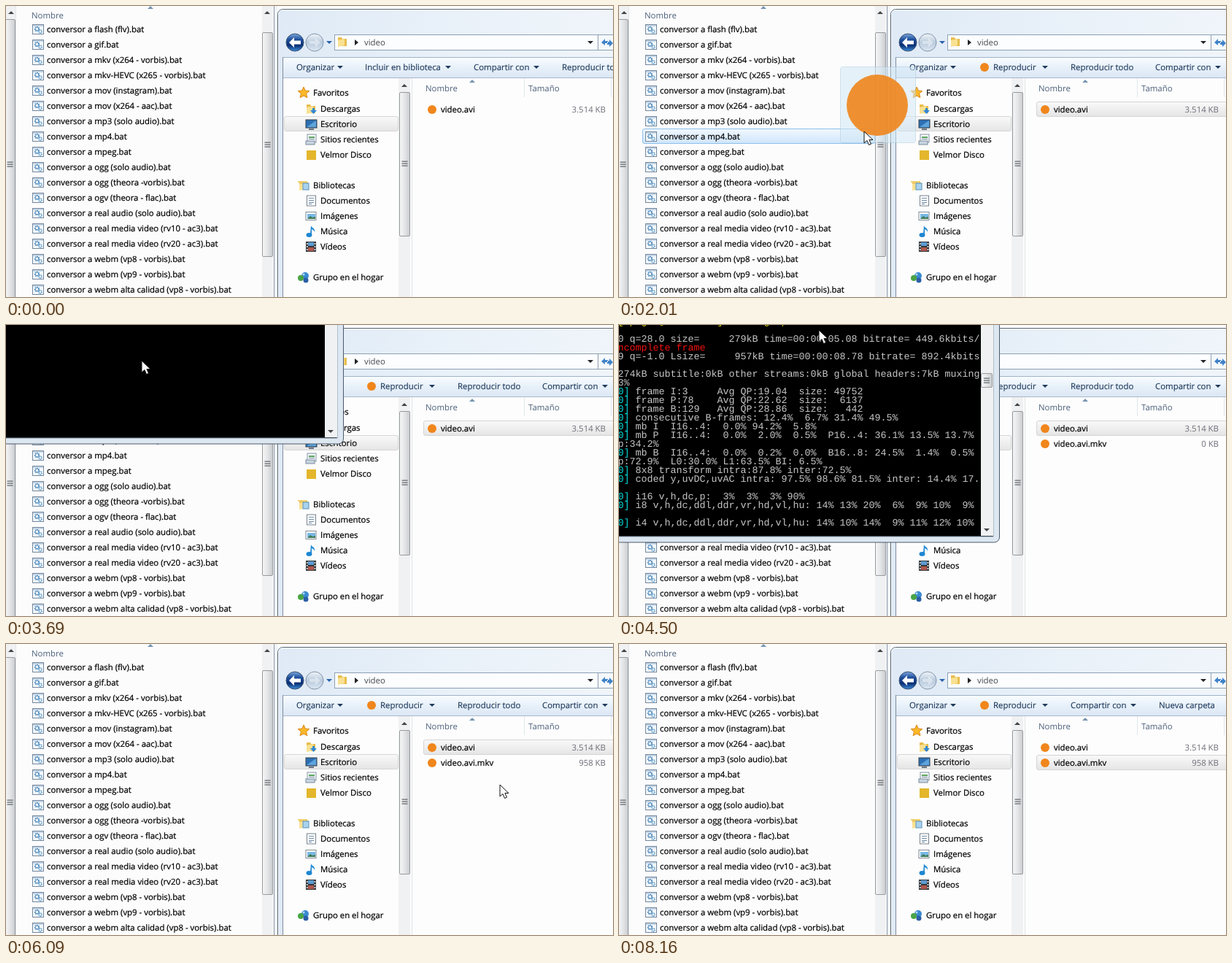
An HTML page that plays this animation: 832 by 399 pixels, repeating every 8250 ms.

```html
<!DOCTYPE html>
<html lang="es">
<head>
<meta charset="utf-8">
<title>Convertir vídeo arrastrando</title>
<style>
  html, body { margin: 0; width: 100%; height: 100%; overflow: hidden; background: #fff; }
  svg { display: block; width: 832px; height: 399px; }
  text { font: 11.4px "Open Sans", "Noto Sans", sans-serif; fill: #000; white-space: pre; text-rendering: geometricPrecision; }
  text[class=""] { stroke: #000; stroke-width: .22px; }
  .head { fill: #4c607a; }
  .bar { fill: #1e395b; stroke: #1e395b; stroke-width: .15px; }
  .size { fill: #6d6d78; text-anchor: end; }
  .address { fill: #45484d; }
  .tip { fill: #1c3fae; stroke: #1c3fae; stroke-width: .15px; }
  .tip tspan { fill: #00005c; stroke: #00005c; }
  .log { font: 13.33px "Liberation Mono", monospace; fill: #c6c6c6; }
  .log .tag { fill: #00e0e0; }
  .red { fill: #f01010; }
  .yellow { fill: #e8e800; }
</style>
</head>
<body>
<svg id="stage" viewBox="0 0 832 399"></svg>
<script>
const LOOP = 8250, STEP = 30, ROW = 21;

const names = ['flash (flv)', 'gif', 'mkv (x264 - vorbis)', 'mkv-HEVC (x265 - vorbis)',
  'mov (instagram)', 'mov (x264 - aac)', 'mp3 (solo audio)', 'mp4', 'mpeg', 'ogg (solo audio)',
  'ogg (theora -vorbis)', 'ogv (theora - flac)', 'real audio (solo audio)',
  'real media video (rv10 - ac3)', 'real media video (rv20 - ac3)', 'webm (vp8 - vorbis)',
  'webm (vp9 - vorbis)', 'webm alta calidad (vp8 - vorbis)'].map(n => `conversor a ${n}.bat`);

// Markup helpers; text is placed by its vertical centre.
const text = (x, y, s, cls = '', id = '') => `<text x="${x}" y="${y + 4}" class="${cls}" id="${id}">${s}</text>`;
const rect = (x, y, w, h, fill, extra = '') => `<rect x="${x}" y="${y}" width="${w}" height="${h}" fill="${fill}" ${extra}/>`;
const path = (d, fill, extra = '') => `<path d="${d}" fill="${fill}" ${extra}/>`;
const disc = (x, y, r, fill, extra = '') => `<circle cx="${x}" cy="${y}" r="${r}" fill="${fill}" ${extra}/>`;
const group = (id, body) => `<g id="${id}">${body}</g>`;
const at = (x, y, body) => `<g transform="translate(${x} ${y})">${body}</g>`;
const down = (x, y, fill = '#1e395b') => path(`M${x - 4} ${y - 2}h8l-4 4z`, fill);
const up = (x, y, fill = '#444') => path(`M${x - 4} ${y + 2}h8l-4-4z`, fill);
const gradient = (id, stops, horizontal) => `<linearGradient id="${id}" x2="${horizontal ? 1 : 0}" y2="${horizontal ? 0 : 1}">` +
  stops.map((c, i) => `<stop offset="${i / (stops.length - 1)}" stop-color="${c}"/>`).join('') + '</linearGradient>';
const media = (x, y) => disc(x, y, 6, '#f0861c');

const grip = (x, y) => [-3, 0, 3].map(d => rect(x - 4, y + d - .5, 8, 1.2, '#5f6469')).join('');
const thumb = (x, y, w, h, gripY) =>
  rect(x + .5, y + .5, w - 1, h - 1, 'url(#thumb)', 'stroke="#979a9e" rx="1.5"') + grip(x + w / 2, gripY);
const highlight = (id, x, y, w, fill, stroke) =>
  rect(x + .5, y + .5, w, 20, `url(#${fill})`, `stroke="${stroke}" rx="2.5" id="${id}"`);

const batIcon = rect(-7.5, -6.5, 15, 13, '#f3f8fc', 'stroke="#74879b"') + rect(-7, -6, 14, 2, '#c3d4e5') +
  disc(-1.5, -.5, 2.6, 'none', 'stroke="#3f7fb5" stroke-width="2" stroke-dasharray="1.5 .8"') +
  disc(3, 3, 2, 'none', 'stroke="#4f92c4" stroke-width="1.6" stroke-dasharray="1.2 .7"');
const folder = path('M-6-6h5l1 2h6v10h-12z', '#e9bd4e') + path('M-6-2l9-2v9l-9 2z', '#f9e193');

const icons = {
  star: path('M0-8l2.3 5 5.5.5-4.2 3.7 1.3 5.5L0 4l-4.9 2.7 1.3-5.5-4.2-3.7 5.5-.5z', '#fbb829', 'stroke="#d98516"'),
  download: folder + path('M2-1h3v3h3l-4.5 5-4.5-5h3z', '#2f87d6'),
  desktop: rect(-7, -6, 15, 11, '#2d6fb4', 'stroke="#39444f"') + path('M-6 4l13-9v9z', '#5da3dc') + rect(-3, 6, 7, 2, '#6a7581'),
  recent: rect(-5, -7, 12, 11, '#f4f7fa', 'stroke="#8695a5"') + rect(-3, -4, 8, 2, '#58a05b') + rect(-3, -1, 8, 1, '#7a8ca0') + rect(-7, 2, 12, 5, '#c8d5e1', 'stroke="#7c8c9c"'),
  cloud: rect(-6, -6, 13, 13, '#e3b62c'),
  library: folder + rect(-1, -3, 8, 9, '#a8d2ee', 'stroke="#5b93b8"') + path('M-8-6h13v2h-13z', '#f1d173'),
  document: rect(-5.5, -7, 12, 14, '#fff', 'stroke="#76818d"') + [-4, -1, 2].map(y => rect(-3, y, 7, 1, '#6e8ba8')).join('') + rect(-3, 4, 4, 1, '#6e8ba8'),
  image: rect(-7, -5.5, 14, 11, '#fff', 'stroke="#7d8995"') + rect(-5, -3, 11, 7, '#79b9e6') + path('M-5 4l4-4 3 2 4-1v3z', '#3f7b56'),
  music: path('M0-8c1 4 6 3 5 9c-1-3-2-3-4-4v7h-2z', '#1d86d2') + '<ellipse cx="-2.5" cy="5" rx="4" ry="3" fill="#1d86d2"/>',
  film: rect(-7, -7, 14, 14, '#33383d') + rect(-4, -6, 8, 5, '#5c9bd1') + rect(-4, 1, 8, 5, '#b0574c') +
    [-5, -1, 3].map(y => rect(-6, y, 1.5, 2, '#eee') + rect(4.7, y, 1.5, 2, '#eee')).join(''),
  home: disc(2, -2, 5, '#3b8ad0') + disc(-4, 1, 4, '#4aa546') + disc(3, 4, 3.5, '#2b5fa6') + disc(0, -4, 1.5, '#b4dcf5'),
};
const places = [['star', 0, 119, 'Favoritos'], ['download', 1, 141, 'Descargas'], ['desktop', 1, 162, 'Escritorio'],
  ['recent', 1, 183, 'Sitios recientes'], ['cloud', 1, 204, 'Velmor Disco'], ['library', 0, 246, 'Bibliotecas'],
  ['document', 1, 267, 'Documentos'], ['image', 1, 288, 'Imágenes'], ['music', 1, 309, 'Música'],
  ['film', 1, 330, 'Vídeos'], ['home', 0, 372, 'Grupo en el hogar']];

const defs = `<defs>
  ${gradient('thumb', ['#f7f7f8', '#e4e5e7', '#c9cccf'], true)}
  ${gradient('glass', ['#dfeaf6', '#e9f1f9', '#f0f5fa'], true)}
  ${gradient('tools', ['#fafdff', '#e8f1fa', '#dce7f5'])}
  ${gradient('blue', ['#f1f8fe', '#cfe5fb'])}
  ${gradient('hover', ['#fafcff', '#ebf4fd'])}
  ${gradient('grey', ['#f9f9f9', '#e5e5e5'])}
  ${gradient('back', ['#7fa9dc', '#1d4f9c', '#0b2f73', '#3f8fdc'])}
  ${gradient('next', ['#f0f4f9', '#b9cadd', '#dce7f2'])}
</defs>`;

const leftWindow = rect(0, 0, 368, 399, '#fcfcfd') +
  rect(0, 0, 13, 399, '#f0f1f2') + thumb(-2, 18, 15, 420, 217) + up(7, 9) + rect(13, 0, 1, 399, '#e2e5e9') +
  text(35, 13, 'Nombre', 'head') + up(198, 2, '#7593b0') +
  highlight('target', 32, 0, 318, 'blue', '#8cc0ec') +
  names.map((n, i) => at(44, 32 + ROW * i, batIcon) + text(56, 32 + ROW * i, n)).join('') +
  rect(351, 0, 15, 399, '#f0f1f2') + thumb(351, 36, 15, 308, 190) + up(358, 9) +
  rect(367, 0, 1, 399, '#8a97a5') + rect(368, 0, 4, 399, '#f0f4f8');

const navigation = disc(396, 50, 12, 'url(#back)', 'stroke="#3a5273"') +
  path('M388 50l7-7v4.5h9v5h-9v4.5z', '#fff') + disc(423, 50, 12, 'url(#next)', 'stroke="#8495a9"') +
  path('M431 50l-7-6v4h-8v4h8v4z', '#f6f9fc', 'opacity=".5"') + down(443, 50, '#2a62ad') +
  rect(450.5, 39.5, 361, 21, '#fbfdfe', 'stroke="#8da0b5"') + at(461, 49, folder) +
  path('M478 46v8l5-4z', '#222') + text(491, 50, 'video', 'address') + down(801, 50, '#222') +
  rect(811.5, 39.5, 30, 21, '#f5f9fc', 'stroke="#8da0b5"') +
  path('M816 50l5-5v3h4v3h-4v3zM832 51l-5-5v3h-3v4h3v3z', '#3f82c9');

const toolSets = [
  ['plain', text(492, 84, 'Incluir en biblioteca', 'bar') + down(606, 84) + text(641, 84, 'Compartir con', 'bar') + down(727, 84) + text(762, 84, 'Reproducir todo', 'bar')],
  ['first', text(619, 84, 'Reproducir todo', 'bar') + text(735, 84, 'Compartir con', 'bar') + down(821, 84)],
  ['second', text(619, 84, 'Compartir con', 'bar') + down(705, 84) + text(740, 84, 'Nueva carpeta', 'bar')],
];
const tools = rect(380, 70, 460, 28, 'url(#tools)') + rect(380, 70, 460, 1, '#9fb2c6') + rect(380, 98, 460, 1, '#a9b9cb') +
  text(398, 84, 'Organizar', 'bar') + down(458, 84) +
  group('play', media(501, 84) + text(513, 84, 'Reproducir', 'bar') + down(584, 84)) +
  toolSets.map(([id, body]) => group(id, body)).join('');

const sidebar = highlight('', 381, 151, 156, 'grey', '#d6d6d6') +
  places.map(([icon, deep, y, label]) => at(408 + 10 * deep, y, icons[icon]) + text(421 + 10 * deep, y, label)).join('') +
  rect(538, 99, 16, 300, '#f0f1f2') + up(546, 109) + thumb(539, 118, 15, 198, 216) + rect(556, 99, 1, 300, '#dfe3e8');

const file = (y, name, size, id) => media(584, y) + text(596, y, name) + text(822, y, size, 'size', id);
const fileList = text(575, 113, 'Nombre', 'head') + text(716, 113, 'Tamaño', 'head') + up(639, 103, '#7593b0') +
  rect(710, 99, 1, 26, '#dfe6ee') + rect(829, 99, 1, 26, '#dfe6ee') +
  highlight('hovered', 572, 0, 270, 'hover', '#c6dff7') +
  highlight('selected', 572, 0, 270, 'grey', '#d4d4d4') + highlight('focused', 572, 0, 270, 'blue', '#9ccbf2') +
  file(142, 'video.avi', '3.514 KB', '') + group('result', file(163, 'video.avi.mkv', '0 KB', 'resultSize'));

const rightWindow = rect(372, 0, 460, 399, '#fdfdfe') +
  rect(372.5, 4.5, 480, 420, 'url(#glass)', 'rx="7" stroke="#55626f"') +
  rect(373.5, 5.5, 480, 420, 'none', 'rx="6" stroke="#fafcfe"') +
  rect(379, 70, 1, 329, '#7d8c9c') + rect(380, 98, 460, 301, '#fdfdfd') + navigation + tools + sidebar + fileList;

// Console lines: vertical centre and text; a leading "0]" is tinted.
const summary = [
  [67, '274kB subtitle:0kB other streams:0kB global headers:7kB muxing'], [79, '3%'],
  [91, '0] frame I:3     Avg QP:19.04  size: 49752'], [103, '0] frame P:78    Avg QP:22.62  size:  6137'],
  [115, '0] frame B:129   Avg QP:28.86  size:   442'], [127, '0] consecutive B-frames: 12.4%  6.7% 31.4% 49.5%'],
  [139, '0] mb I  I16..4:  0.0% 94.2%  5.8%'], [151, '0] mb P  I16..4:  0.0%  2.0%  0.5%  P16..4: 36.1% 13.5% 13.7%'],
  [163, 'p:34.2%'], [175, '0] mb B  I16..4:  0.0%  0.2%  0.0%  B16..8: 24.5%  1.4%  0.5%'],
  [187, 'p:72.9%  L0:30.0% L1:63.5% BI: 6.5%'], [199, '0] 8x8 transform intra:87.8% inter:72.5%'],
  [211, '0] coded y,uvDC,uvAC intra: 97.5% 98.6% 81.5% inter: 14.4% 17.'], [235, '0] i16 v,h,dc,p:  3%  3%  3% 90%'],
  [247, '0] i8 v,h,dc,ddl,ddr,vr,hd,vl,hu: 14% 13% 20%  6%  9% 10%  9%'],
  [271, '0] i4 v,h,dc,ddl,ddr,vr,hd,vl,hu: 14% 10% 14%  9% 11% 12% 10%']];
const opening = [[151, '       Metadata:'], [163, '         encoder         : Lavf'], [175, '         Stream #0:0: Video: h264 (libx264)'],
  [187, '         Stream #0:1: Audio: vorbis'], [199, '       Stream mapping:'], [211, '         Stream #0:0 -> #0:0 (libx264)'],
  [223, '         Stream #0:1 -> #0:1 (libvorbis)'], [247, '       Press [q] to stop, [?] for help'], [271, '       frame=   24 fps=0.0 q=0.0']];
const logLine = ([y, s]) => text(-1.5, y, s.replace(/^0\]/, '<tspan class="tag">0]</tspan>'), 'log');

const consoleWindow = rect(-20, -20, 541.5, 318, '#dce7f2', 'rx="7" stroke="#4d5a68"') +
  rect(-20, -20, 533, 310, '#000', 'stroke="#8495a6"') + rect(496, -20, 17, 309, '#f0f1f2') +
  thumb(496, 66, 16, 20, 76) + down(504, 281, '#444') +
  group('opening', opening.map(logLine).join('')) +
  group('progress', text(-1.5, -5, '[mpeg4 @ 00000000] warning: packed B-frames in video', 'log yellow') +
    logLine([19, '0 q=28.0 size=     279kB time=00:00:05.08 bitrate= 449.6kbits/']) +
    text(-1.5, 31, 'ncomplete frame', 'log red') +
    logLine([43, '9 q=-1.0 Lsize=     957kB time=00:00:08.78 bitrate= 892.4kbits'])) +
  group('summary', summary.map(logLine).join(''));

const ghost = rect(.5, .5, 103, 104, '#d4e9f6', 'rx="3" stroke="#a9c9de" opacity=".55"') + disc(51, 53, 42, '#f0861c', 'opacity=".9"');
const tip = rect(.5, .5, 262, 18, '#f5f8fd', 'rx="2.5" stroke="#767b86" id="tipBox"') +
  path('M4 8.5h4v-4h3v4h4v3h-4v4h-3v-4h-4z', '#2468c4') +
  '<text x="20" y="14" class="tip" id="tipText">Abrir con <tspan id="tipName"></tspan></text>';
const arrow = path('M0 0V16l4-3.5 2.5 6 3-1.2-2.6-5.8h5.1z', '#fff', 'stroke="#111" stroke-linejoin="round"');

const layers = { console: consoleWindow, ghost, tip, cursor: arrow };
document.getElementById('stage').innerHTML = defs + leftWindow + rightWindow +
  Object.entries(layers).map(([id, body]) => group(id, body)).join('');

const el = id => document.getElementById(id);
const show = (id, opacity) => el(id).setAttribute('opacity', +opacity);
const move = (id, x, y) => el(id).setAttribute('transform', `translate(${x} ${y})`);
const ramp = (t, a, b) => Math.min(1, Math.max(0, (t - a) / (b - a)));
const within = (t, a, b) => t >= a && t < b;

// Cursor runs: [time, x, y] points joined by straight moves, plus the end of each run.
const runs = [
  { end: 480, points: [[390, 828, 102], [420, 822, 120], [450, 826, 140]] },
  { end: 1320, points: [[750, 828, 208], [840, 800, 214], [930, 718, 206], [1050, 640, 175], [1170, 606, 145]] },
  { end: 2160, points: [[1320, 606, 145], [1440, 606, 147], [1530, 609, 154], [1560, 610, 163], [1680, 590, 205],
    [1770, 530, 218], [1890, 425, 200], [1980, 355, 175], [2010, 336, 172], [2130, 298, 172]] },
  { end: 3900, points: [[2160, 298, 172], [2280, 268, 140], [2370, 255, 97], [2490, 200, 84], [2550, 188, 82],
    [2580, 188, 82], [2730, 172, 75], [3630, 172, 75], [3690, 186, 49]] },
  { end: 5670, points: [[3900, 275, 119], [4230, 275, 119], [4500, 274, 7], [4620, 300, 8], [4800, 382, 59],
    [5070, 382, 59], [5190, 470, 220], [5310, 590, 357], [5430, 745, 222]] },
  { end: 7170, points: [[5670, 745, 222], [5910, 715, 212], [6090, 677, 193], [6210, 650, 175], [6330, 636, 163],
    [6600, 636, 163], [6750, 690, 140], [6900, 760, 120], [7110, 760, 120], [7140, 800, 108]] },
];
function cursorAt(t) {
  const run = runs.find(r => within(t, r.points[0][0], r.end));
  if (!run) return null;
  const next = run.points.findIndex(p => p[0] > t);
  if (next < 0) return run.points[run.points.length - 1].slice(1);
  const [a, b] = [run.points[next - 1], run.points[next]];
  const k = ramp(t, a[0], b[0]);
  return [1, 2].map(i => Math.round(a[i] + (b[i] - a[i]) * k));
}

// The dragged picture trails the cursor by one step.
function drawDrag(t, cursor) {
  const dragging = within(t, 1350, 3420);
  const fade = 1 - ramp(t, 3270, 3420);
  show('ghost', dragging ? fade : 0);
  const over = dragging && cursor[0] < 350;
  show('target', over ? fade : 0);
  show('tip', over && t >= 2190 ? fade : 0);
  if (!dragging) return;
  const [lagX, lagY] = cursorAt(t - STEP);
  move('ghost', lagX - 52, lagY - 92);
  move('tip', cursor[0] + 10, cursor[1] + 14);
  if (!over) return;
  const row = Math.floor((cursor[1] - 21.5) / ROW);
  el('target').setAttribute('y', 21.5 + ROW * row);
  el('tipName').textContent = names[row];
  el('tipBox').setAttribute('width', Math.round(el('tipText').getComputedTextLength()) + 26);
}

function drawFiles(t, cursor) {
  const mode = t < 1320 ? 'plain' : t < 6570 ? 'first' : 'second';
  toolSets.forEach(([id]) => show(id, id === mode));
  show('play', mode !== 'plain');
  show('result', t >= 4230);
  el('resultSize').textContent = t < 5250 ? '0 KB' : '958 KB';

  const rowY = mode === 'second' ? 152.5 : 131.5;
  ['selected', 'focused'].forEach(id => el(id).setAttribute('y', rowY));
  show('selected', mode !== 'plain');
  show('focused', within(t, 6570, 8160) ? ramp(t, 6540, 6690) : 0);

  const row = cursor && cursor[0] > 572 && !within(t, 1350, 3420) ? Math.floor((cursor[1] - 131) / ROW) : -1;
  const rows = t < 4230 ? 1 : 2;
  show('hovered', row >= 0 && row < rows);
  el('hovered').setAttribute('y', 131.5 + ROW * Math.max(row, 0));
}

function drawConsole(t) {
  show('console', ramp(t, 3270, 3480) * (1 - ramp(t, 4650, 4770)));
  const finished = t >= 4230;
  move('console', finished ? 0 : -59, finished ? 0 : -135);
  show('opening', within(t, 3900, 4230));
  show('progress', finished);
  show('summary', t >= 4350);
}

const start = performance.now();
function frame() {
  const t = Math.floor((performance.now() - start) % LOOP / STEP) * STEP;
  const cursor = cursorAt(t);
  show('cursor', !!cursor);
  if (cursor) move('cursor', ...cursor);
  drawDrag(t, cursor);
  drawFiles(t, cursor);
  drawConsole(t);
  requestAnimationFrame(frame);
}
frame();
</script>
</body>
</html>
```
